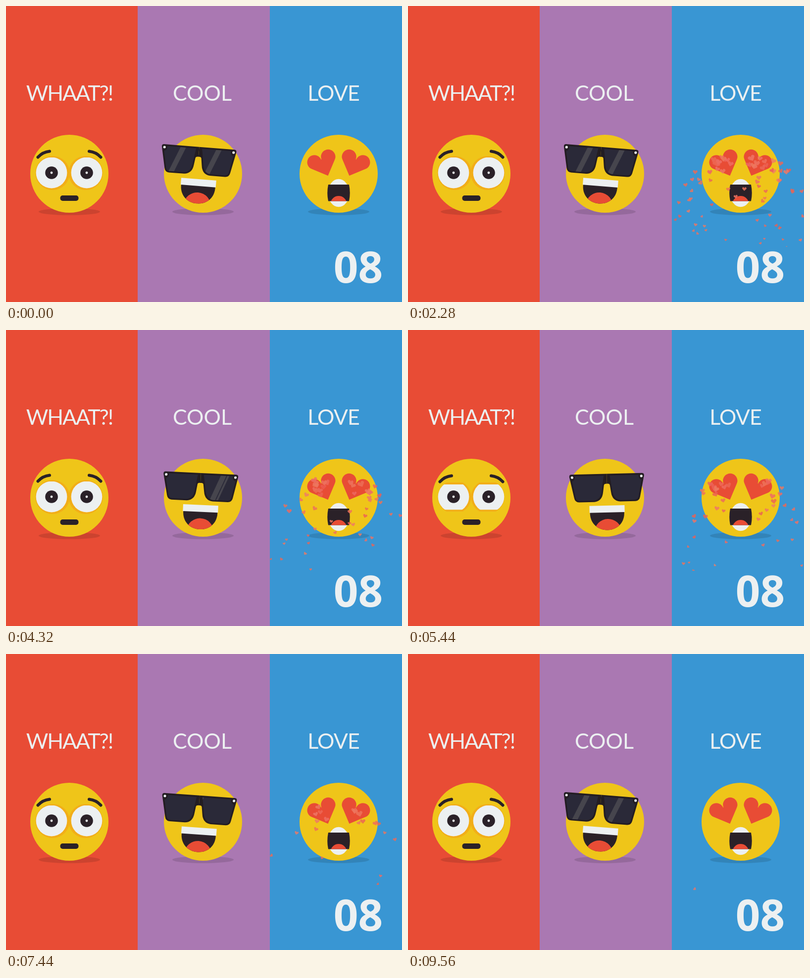
Recreate the animation shown at these times as an HTML page with a canvas. Size 800 px wide and 600 px high, loop 9600 ms.

```html
<!DOCTYPE html>
<html lang="en">
<head>
<meta charset="utf-8">
<title>Emoji reactions</title>
<style>
  html, body { margin: 0; width: 100%; height: 100%; overflow: hidden; }
  canvas { display: block; width: 800px; height: 600px; }
</style>
</head>
<body>
<canvas id="stage" width="800" height="600"></canvas>
<script>
const ctx = document.getElementById('stage').getContext('2d');
const LOOP = 9600, STEP = 40, TAU = Math.PI * 2;
const RED = '#e84c35', PURPLE = '#aa78b2', BLUE = '#3996d3', YELLOW = '#efc519';
const DARK = '#2a2128', WHITE = '#ecf0f1', LENS = '#2a2938', SHINE = '#46454d';

const clamp = v => Math.max(0, Math.min(1, v));
const mix = (a, b, k) => a + (b - a) * k;

function fill(color, draw) {
  ctx.fillStyle = color;
  ctx.beginPath();
  draw();
  ctx.fill();
}
const rect = (color, x, y, w, h) => fill(color, () => ctx.rect(x, y, w, h));
const ellipse = (color, x, y, rx, ry = rx) => fill(color, () => ctx.ellipse(x, y, rx, ry, 0, 0, TAU));

function group(x, y, angle, draw, sx = 1, sy = sx) {
  ctx.save();
  ctx.translate(x, y);
  ctx.rotate(angle);
  ctx.scale(sx, sy);
  draw();
  ctx.restore();
}

function clipped(path, draw) {
  ctx.save();
  ctx.beginPath();
  path();
  ctx.clip();
  draw();
  ctx.restore();
}

// Symmetric ease-in-out, equal to cubic-bezier(.67, 0, .33, 1).
function ease(x) {
  let lo = 0, hi = 1;
  for (let i = 0; i < 24; i++) {
    const s = (lo + hi) / 2, r = 1 - s;
    if (2.01 * s * r * r + 0.99 * s * s * r + s * s * s < x) lo = s; else hi = s;
  }
  return lo * lo * (3 - 2 * lo);
}

// Piecewise linear value through [time, value] points.
function track(points, t) {
  if (t <= points[0][0]) return points[0][1];
  for (let i = 1; i < points.length; i++) {
    const [t0, v0] = points[i - 1], [t1, v1] = points[i];
    if (t <= t1) return mix(v0, v1, (t - t0) / (t1 - t0));
  }
  return points[points.length - 1][1];
}

function label(text, x, spacing) {
  ctx.font = '400 43px Lato, sans-serif';
  ctx.letterSpacing = spacing + 'px';
  ctx.fillText(text, x + spacing / 2, 191.5);
}

function face(x) {
  ellipse('rgba(0,0,0,0.12)', x, 417, 62, 7);
  ellipse(YELLOW, x, 340, 79);
}

// Heart with its tip at the origin.
function heartPath() {
  ctx.moveTo(0, 0);
  ctx.arc(15, -35.5, 14.6, Math.PI / 4, Math.PI, true);
  ctx.arc(-15, -35.5, 14.6, 0, Math.PI * 3 / 4, true);
  ctx.closePath();
}

// Lid events: start, end, lowest openness, ramp time.
const LIDS = [[600, 1320, 0.25, 160], [3120, 3400, 0.03, 120], [4080, 4300, 0.03, 100], [4400, 4620, 0.2, 100]];

function drawWhaat(t) {
  const p = t % 4800;
  let open = 1;
  for (const [start, end, low, ramp] of LIDS) {
    open = Math.min(open, 1 - (1 - low) * clamp(Math.min(p - start, end - p) / ramp));
  }
  face(128);
  const half = 31.5 * open;
  if (open > 0.3) {
    clipped(() => ctx.rect(49, 338.5 - half * 1.15, 158, half * 2.3), () => {
      for (const x of [94, 161]) ellipse('#f2ae18', x, 338.5, 30 + 4.6 * open);
    });
  }
  clipped(() => ctx.rect(49, 338.6 - half, 158, half * 2), () => {
    for (const x of [92, 163]) {
      ellipse(WHITE, x, 338, 31.4);
      ellipse(DARK, x, 338, 12.8);
      ellipse(WHITE, x, 338, 2.4);
    }
  });
  ctx.strokeStyle = DARK;
  ctx.lineWidth = 6;
  ctx.lineCap = 'round';
  const drop = 4 * clamp((1 - open) / 0.75) - 0.4;
  for (const side of [-1, 1]) {
    group(128, drop, 0, () => {
      ctx.beginPath();
      ctx.moveTo(63.5 * side, 307);
      ctx.quadraticCurveTo(54 * side, 296.5, 40 * side, 295);
      ctx.stroke();
    });
  }
  fill(DARK, () => ctx.roundRect(109.5, 384, 37, 11, 5));
}

function framePath() {
  ctx.moveTo(0, -6);
  ctx.lineTo(-71, -6);
  ctx.quadraticCurveTo(-76, -6, -75.5, -1);
  ctx.lineTo(-66.5, 42);
  ctx.quadraticCurveTo(-65, 50, -57, 50.5);
  ctx.lineTo(-26, 50.5);
  ctx.quadraticCurveTo(-10, 49, -8, 31);
  ctx.lineTo(-6, 17);
  ctx.quadraticCurveTo(-5.5, 14, -2, 14);
  ctx.lineTo(0, 14);
  ctx.closePath();
}

function lensPath() {
  ctx.moveTo(-64, -2.5);
  ctx.lineTo(-6, -2.5);
  ctx.lineTo(-11, 29);
  ctx.quadraticCurveTo(-13, 46, -27, 47.5);
  ctx.lineTo(-56, 47.5);
  ctx.quadraticCurveTo(-62, 47, -63.5, 41);
  ctx.lineTo(-70, 8);
  ctx.quadraticCurveTo(-64, 5, -64, -2.5);
  ctx.closePath();
}

function band(x, w) {
  fill(SHINE, () => {
    ctx.moveTo(x + 11, -4);
    ctx.lineTo(x + w + 11, -4);
    ctx.lineTo(x + w - 11, 50);
    ctx.lineTo(x - 11, 50);
  });
}

const LEFT_SHINE = [[1960, 8], [2280, -33], [2400, -43], [2720, -95]];
const RIGHT_SHINE = [[1780, 90], [1920, 35], [2280, 31], [2400, 29], [2720, -20]];

function glasses(p) {
  const time = p < 900 ? p + 2400 : p;
  for (const side of [1, -1]) {
    group(0, 0, 0, () => {
      fill('#231d22', framePath);
      fill(LENS, lensPath);
    }, side, 1);
    clipped(() => {
      ctx.save();
      ctx.scale(side, 1);
      lensPath();
      ctx.restore();
    }, () => {
      const x = track(side > 0 ? LEFT_SHINE : RIGHT_SHINE, time);
      band(x - 5, 11);
      if (time < 2150) band(x + 8, 4);
    });
    ellipse(WHITE, -70 * side, 0, 2.6);
  }
}

function grin() {
  const mouth = () => {
    ctx.moveTo(-34.5, 12);
    ctx.lineTo(34.5, 12);
    ctx.bezierCurveTo(36, 35, 20, 49.5, 0, 49.5);
    ctx.bezierCurveTo(-20, 49.5, -36, 35, -34.5, 12);
  };
  fill(DARK, mouth);
  clipped(mouth, () => ellipse(RED, 1, 53, 27, 26));
  rect(WHITE, -35.5, 0, 71, 14);
}

function drawCool(t) {
  const p = t % 2400, q = (p + 24) % 2400;
  const swing = q < 1200 ? 2 * ease(q / 1200) - 1 : 1 - 2 * ease(q / 1200 - 1);
  const tilt = -swing * 4.6 * Math.PI / 180, lift = swing * swing;
  face(398);
  group(399 + 9.6 * swing, 356.5 - 5.5 * lift, tilt, grin);
  group(398.7 + 8.7 * swing, 298.2 - 6.6 * lift, tilt, () => glasses(p));
}

function drawLove() {
  face(672);
  for (const side of [-1, 1]) {
    group(672 + 21.5 * side, 344, side * 0.39, () => fill(RED, heartPath));
  }
  ellipse(WHITE, 672, 379, 21.5, 28.3);
  const mouth = () => {
    ctx.moveTo(651, 362);
    ctx.lineTo(693, 362);
    ctx.quadraticCurveTo(696.5, 379, 693, 395.5);
    ctx.lineTo(651, 395.5);
    ctx.quadraticCurveTo(647.5, 379, 651, 362);
  };
  fill(DARK, mouth);
  clipped(mouth, () => ellipse(RED, 672, 400, 16, 15));
}

let seed = 41;
function random() {
  seed = (seed * 1664525 + 1013904223) % 4294967296;
  return seed / 4294967296;
}

// The emission rate falls off linearly until the fountain runs dry.
const COUNT = 450, EMIT = 9100;
const hearts = Array.from({ length: COUNT }, (_, i) => {
  const side = random() < 0.5 ? -1 : 1;
  return {
    birth: EMIT * (1 - Math.sqrt(1 - i / COUNT)),
    life: 1000 + 220 * random(),
    x: 672 + side * 37 + (random() - 0.5) * 38,
    y: 315 + (random() - 0.5) * 22,
    vx: side * (165 * random() - 22),
    vy: -50 + 70 * random(),
    size: 10.5 + 3.5 * random(),
    angle: (random() - 0.5) * 1.1,
    spin: (random() - 0.5) * 1.2,
    color: `hsl(${3 + 8 * random()}, 80%, ${62 + 5 * random()}%)`
  };
});

function drawHearts(t) {
  ctx.globalAlpha = 0.84;
  clipped(() => ctx.rect(524, 278, 276, 210), () => {
    for (const h of hearts) {
      const age = t - h.birth;
      if (age <= 0 || age > h.life) continue;
      const s = age / 1000;
      const scale = mix(h.size, 4.5, age / h.life) / 59;
      group(h.x + h.vx * s, h.y + h.vy * s + 185 * s * s, h.angle + h.spin * s, () => {
        ctx.translate(0, 27);
        fill(h.color, heartPath);
      }, scale);
    }
  });
  ctx.globalAlpha = 1;
}

function draw(t) {
  rect(RED, 0, 0, 266, 600);
  rect(PURPLE, 266, 0, 267, 600);
  rect(BLUE, 533, 0, 267, 600);
  ctx.textAlign = 'center';
  ctx.fillStyle = WHITE;
  label('WHAAT?!', 129, -2);
  label('COOL', 396.5, 0);
  label('LOVE', 662, -0.8);
  ctx.letterSpacing = '0px';
  ctx.font = '750 87px "Open Sans", sans-serif';
  ctx.fillText('08', 711.5, 561);
  drawWhaat(t);
  drawCool(t);
  drawLove();
  drawHearts(t);
}

const start = performance.now();
function tick() {
  const elapsed = (performance.now() - start) % LOOP;
  draw(Math.floor(elapsed / STEP) * STEP);
  requestAnimationFrame(tick);
}
tick();
</script>
</body>
</html>
```
